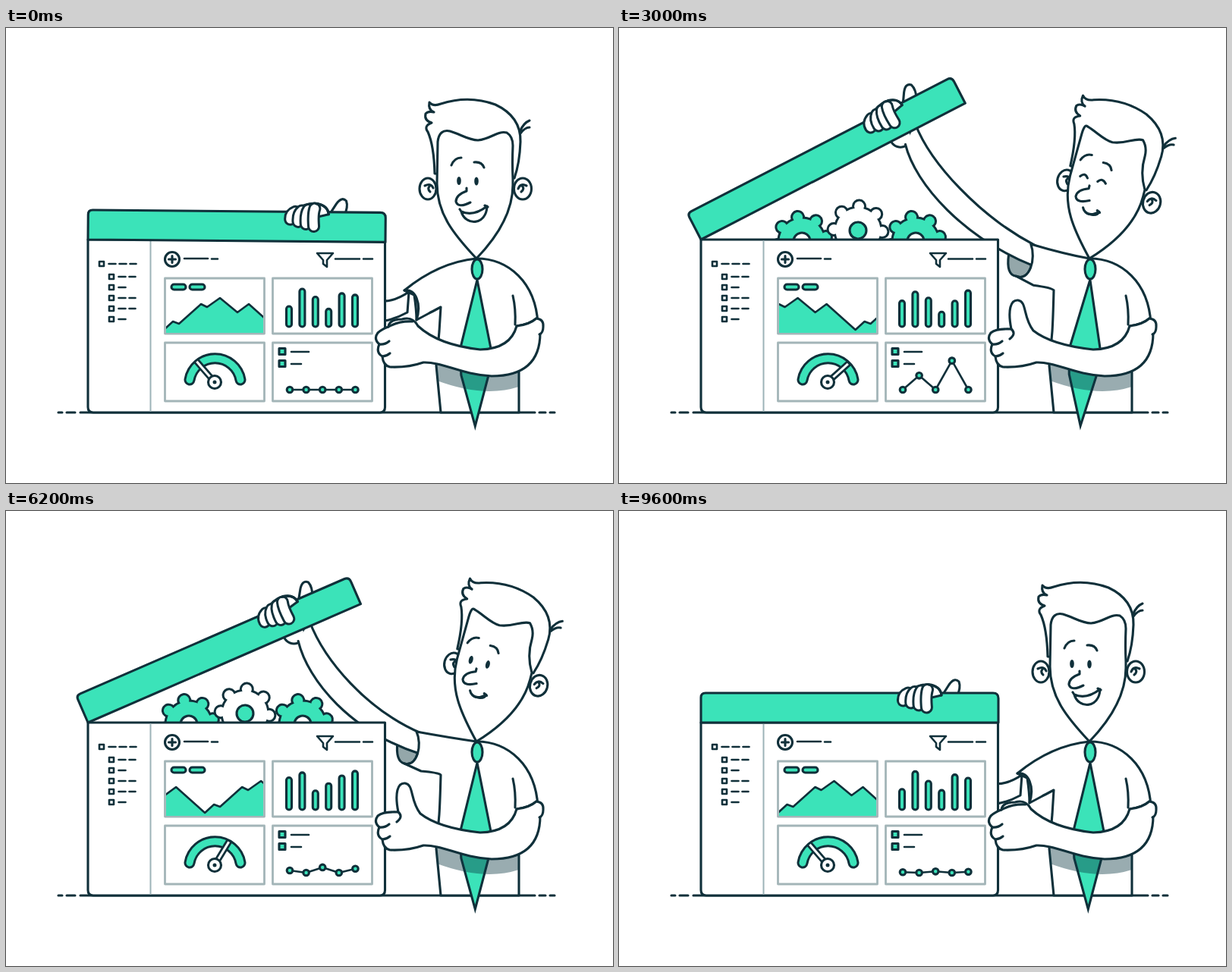
Write an HTML page that moves like this. It is 800 px wide and 600 px high and loops after 9.7 s.

```html
<!DOCTYPE html>
<html lang="en">
<head>
<meta charset="utf-8">
<title>Dashboard box</title>
<style>
  html, body { margin: 0; width: 100%; height: 100%; overflow: hidden; background: #fff; }
  svg { display: block; width: 100vw; height: 100vh; }
  .ink { fill: none; stroke: #10303a; stroke-width: 3.1; stroke-linecap: round; stroke-linejoin: round; }
  .w { fill: #fff; }
  .g { fill: #3be3b9; }
  .d { fill: #10303a; stroke: none; }
  .thin { stroke-width: 2.6; }
  .frame { stroke: #a3b5b8; stroke-width: 2.8; }
</style>
</head>
<body>
<svg viewBox="0 0 800 600" class="ink">
  <defs>
    <clipPath id="areaClip"><rect x="211" y="331" width="128" height="71"/></clipPath>
  </defs>
  <path d="M69 507H74M80 507H91M98 507H697M703 507H711M717 507H723"/>

  <g id="gears"></g>

  <path id="cuffShade" fill="#94a7aa"/>
  <g class="lid"><circle class="w" cx="404" cy="279" r="14"/></g>
  <path id="backArm" class="w"/>
  <g class="lid"><path class="w" d="M424 246Q430 237 435 229Q442 219 448 225Q451 233 445 246Z"/></g>

  <path class="w" d="M108 279H499.500V500Q499.500 507 493 507H115Q108 507 108 500Z"/>
  <path d="M190.500 281V505" stroke="#9db4b8" stroke-width="2"/>
  <g id="side" class="w thin"></g>

  <circle class="w" cx="219" cy="305" r="9.500"/>
  <path d="M219 300.500V309.500M214.500 305H223.500"/>
  <path class="thin" d="M235 304H266M271 304.500H279M434 304.500H466M471 304.500H483"/>
  <path class="w thin" d="M410 297H431L423 306V315L418 311V306Z"/>

  <g id="frames" class="frame"></g>
  <path id="area" class="g thin" clip-path="url(#areaClip)"/>
  <rect class="g" x="218" y="338" width="19" height="7" rx="3.500"/>
  <rect class="g" x="242" y="338" width="20" height="7" rx="3.500"/>
  <g id="bars" class="g"></g>

  <path d="M242 464A34 34 0 0 1 309 464" stroke-width="15"/>
  <path d="M242 464A34 34 0 0 1 309 464" stroke="#3be3b9" stroke-width="9"/>
  <g id="needle" stroke-linecap="butt">
    <path d="M275 467V429" stroke-width="8.500"/>
    <path d="M275 467V431" stroke="#fff" stroke-width="3"/>
  </g>
  <circle class="w" cx="275" cy="467" r="8.500"/>
  <circle class="d" cx="275" cy="467" r="2.500"/>

  <rect class="g" x="360" y="422.500" width="8" height="8"/>
  <rect class="g" x="360" y="438.500" width="8" height="8"/>
  <path class="thin" d="M376 427H399M376 443H389"/>
  <path id="line" class="thin"/>
  <g id="dots" class="g"></g>

  <g class="lid">
    <path class="g" d="M108 279V246Q108 240 114 240H493Q500 240 500 247V279Z"/>
    <path class="w" d="M380 238Q396 227 411 229Q424 232 425 243L412 246L402 256L380 250Z"/>
    <g id="fingers"></g>
    <path d="M408 229Q424 231 425 243"/>
  </g>

  <path id="torso" class="w"/>
  <path d="M668 353Q672 370 671 391"/>
  <path id="tie" class="g" d="M621 332L641 428L637 458L620 525L601 458L599 425Z" stroke-linejoin="miter"/>
  <path id="shade" fill="#0e3a43" fill-opacity=".42" stroke="none"/>
  <ellipse class="g" cx="621" cy="318" rx="7" ry="13"/>
  <path id="arm" class="w"/>
  <path id="folds"/>
  <path class="w" d="M673 393Q690 391 699 383Q709 384 708 394Q708 402 703 404"/>

  <g id="head">
    <g id="earL">
      <ellipse class="w" cx="556" cy="212" rx="11" ry="14"/>
      <path d="M552 208Q560 204 563 211M558 209Q555 212 559 216"/>
    </g>
    <ellipse class="w" cx="681" cy="212" rx="11.500" ry="14"/>
    <path d="M675 212Q678 204 686 208M680 208Q684 212 679 216"/>
    <path d="M677 137Q682 125 690 122M678 139Q684 131 690 131"/>
    <path class="w" d="M565 192Q564 155 556 137Q550 129 561 125Q551 122 553 113Q557 109 564 111Q556 108 558 98Q563 104 573 100Q610 88 645 101Q679 117 678 150Q677 178 670 198Z"/>
    <path id="skin" class="w"/>
    <g id="face">
      <path d="M587 181Q591 171 600 171M617 177Q627 176 630 184"/>
      <path d="M607 211V215Q593 220 593 229Q596 238 612 230"/>
      <g id="open" class="d">
        <ellipse cx="597" cy="201.500" rx="2.800" ry="5.500"/>
        <ellipse cx="620" cy="202" rx="2.800" ry="5.500"/>
      </g>
      <path id="shut" d="M592 202Q597 195 602 202M616 203Q621 196 627 203"/>
      <path id="mouth" class="w"/>
    </g>
  </g>
</svg>
<script>
const LOOP = 9700, HALF = LOOP / 2, TEETH = 8, TAU = Math.PI * 2;
const $ = id => document.getElementById(id);
const set = (id, name, v) => $(id).setAttribute(name, v);
const mix = (a, b, k) => a + (b - a) * k;
const clamp = v => Math.min(1, Math.max(0, v));
const repeat = (n, fn) => Array.from({ length: n }, (_, i) => fn(i)).join("");

// Smooth step from 0 to 1, and a soft hump, between two times.
const rise = (t, a, b) => { const u = clamp((t - a) / (b - a)); return u * u * (3 - 2 * u); };
const hump = (t, a, b) => Math.sin(Math.PI * clamp((t - a) / (b - a))) ** 2;

const lidAngle = t => 27.3 * rise(t, 1850, 2950) - 3.8 * rise(t, 3000, 3900)
  - 2.4 * rise(t, 6300, 7400) - 21.1 * rise(t, 8000, 9500) - .5 * (1 - rise(t, 0, 600));
const headTurn = t => rise(t, 1900, 2850) - .72 * hump(t, 3200, 5200) - rise(t, 8000, 8700);
const tieSwing = t => .5 + 3.5 * (hump(t, 2000, 3600) + hump(t, 4500, 6100)) - 2.8 * hump(t, 3200, 4800);
const handShift = t => 10 * hump(t, 3000, 5000) - 11 * hump(t, 7400, 9400);
const gearSink = t => 62 * (1 - rise(t, 1600, 2900) + rise(t, 7800, 9300));
const smileSize = t => 1 - rise(t, 2300, 2700) + .35 * rise(t, 6300, 7000) + .65 * rise(t, 8000, 8400);
const needleTurn = t => -41 + 104 * (rise(t, 400, 1900) - rise(t, 2500, 4600));
const lineRise = t => rise(t, 600, 3200) - rise(t, 4100, HALF);

const ridge = [[0, 398], [12, 387], [20, 390], [49, 364], [57, 368], [74, 356], [97, 375], [112, 364]];
// Bars: mean top, swing, phase in turns.
const bars = [[359, 8, 0], [345, 3, .3], [361, 8, .6], [366, 9, .17], [351, 9, .27], [347, 5, -.04]];
const lifts = [[0, 19, 0, 39, 0], [15, 0, 35, 0, 26]];
const dotX = i => 374 + i * 21.6;
const gears = [[241, 281, "#3be3b9", "#fff"], [391, 281, "#3be3b9", "#fff"], [315, 267, "#fff", "#3be3b9"]];

function build() {
  $("gears").innerHTML = gears.map(([x, y, fill, hole], n) => {
    const layer = (grow, color) => `<g fill="${color}" stroke="none"><circle r="${31 + grow}"/>` +
      repeat(TEETH, i => `<circle cy="-32" r="${8 + grow}" transform="rotate(${i * 360 / TEETH})"/>`) + "</g>";
    return `<g id="gear${n}">${layer(1.5, "#10303a")}${layer(-1.5, fill)}<circle r="11" fill="${hole}"/></g>`;
  }).join("");

  $("side").innerHTML = repeat(6, i => {
    const x = i ? 139 : 126, y = 314 + 14 * i - (i ? 0 : 3), long = i ? (i === 2 || i === 5 ? 9 : 22) : 36;
    return `<rect x="${x - 3}" y="${y - 3}" width="6" height="6"/>` +
      `<path stroke-dasharray="9 5" d="M${x + 9.5} ${y}h${long}"/>`;
  });

  $("frames").innerHTML = repeat(4, i => {
    const low = i > 1;
    return `<rect x="${209.5 + 142 * (i % 2)}" y="${low ? 415 : 330}" width="131" height="${low ? 77 : 73}"/>`;
  });
  $("bars").innerHTML = repeat(6, i => `<rect id="bar${i}" x="${369.5 + i * 17.4}" width="7" rx="3.500"/>`);
  $("dots").innerHTML = repeat(5, i => `<circle id="dot${i}" cx="${dotX(i)}" r="3.800"/>`);

  $("fingers").innerHTML = repeat(4, i => {
    const d = `M${381 + 8.5 * i} ${240 - 1.500 * i}Q${374 + 10 * i} 243 ${374.5 + 10.3 * i} ${250 + 3 * i}`;
    return `<path d="${d}" stroke-width="17"/><path d="${d}" stroke="#fff" stroke-width="11"/>`;
  });
}

function drawCharts(t) {
  const shift = 358 - t * 150 / LOOP;
  let d = "M190 420";
  for (let k = -2; k < 2; k++)
    for (const [x, y] of ridge) d += `L${(x + shift + k * 150).toFixed(1)} ${y}`;
  set("area", "d", d + "L700 420Z");

  bars.forEach(([mean, swing, phase], i) => {
    const top = mean + swing * Math.cos(TAU * (2 * t / HALF - phase));
    set("bar" + i, "y", top);
    set("bar" + i, "height", 394 - top);
  });

  set("needle", "transform", `rotate(${needleTurn(t % HALF)} 275 467)`);

  const amp = lineRise(t % HALF);
  const ys = lifts[t < HALF ? 0 : 1].map(v => 477 - v * amp);
  set("line", "d", "M" + ys.map((y, i) => dotX(i) + " " + y).join("L"));
  ys.forEach((y, i) => set("dot" + i, "cy", y));
}

function drawTorso(lid, q) {
  const p = (x0, y0, x1, y1) => `${mix(x0, x1, q).toFixed(1)} ${mix(y0, y1, q).toFixed(1)} `;
  const sx = mix(525, 541, q), sy = mix(346, 291, q);
  const under = p(541, 385, 525, 333);
  const rim = "C" + p(540, 343, 549, 308) + p(548, 364, 542, 338) + under;
  set("torso", "d", `M620 304Q${p(570, 309, 585, 299)}${sx} ${sy}${rim}L${p(556, 377, 547, 343)}` +
    `Q${p(571, 369, 570, 345)}${p(573, 368, 573, 348)}Q572 385 571 400L567 445L573 507H676V445` +
    `L701 390C698 335 662 304 620 304Z`);
  set("cuffShade", "d", `M${sx} ${sy}${rim}Q${p(541, 372, 513, 330)}${p(538, 352, 516, 304)}Z`);

  // Raised arm: two edges from under the lid to the sleeve.
  const a = -lid * Math.PI / 180, bend = mix(40, -29, q);
  const wrist = (x, y) => [108 + x * Math.cos(a) - y * Math.sin(a), 279 + x * Math.sin(a) + y * Math.cos(a)];
  const [ux, uy] = wrist(321, -6), [lx, ly] = wrist(297, 12);
  const low = sy + 29;
  set("backArm", "d", `M${ux} ${uy}C${ux + 20} ${uy + 52} 475 ${sy + bend} ${sx + 6} ${sy + 2}` +
    `L${sx + 4} ${low}C455 ${low + bend} ${lx + 13} ${ly + 53} ${lx} ${ly}`);
}

function drawFrontArm(th, dy) {
  const h = (x0, y0, x1, y1) => `${mix(x0, x1, th).toFixed(1)} ${(mix(y0, y1, th) + dy).toFixed(1)} `;
  const f = (x, y, part = 1) => `${x} ${(y + dy * part).toFixed(1)} `;
  const root = h(504, 394, 517, 397);
  set("arm", "d", `M${root}C${h(505, 386, 512, 372)}${h(512, 384, 516, 358)}${h(522, 384, 526, 359)}` +
    `C${h(532, 381, 538, 361)}${h(538, 384, 532, 381)}${h(543, 393, 546, 399)}` +
    `Q${f(570, 418, .6)}${f(625, 424, .2)}Q665 423 673 393Q690 391 699 383L704 402Q704 459 640 459` +
    `C${f(600, 457, .3)}${f(575, 440, .9)}${f(550, 441)}Q${f(530, 448)}${f(506, 447)}` +
    `Q${f(497, 445)}${f(496, 433)}Q${f(487, 428)}${f(492, 417)}Q${f(484, 410)}${f(490, 402)}Q${f(497, 396)}${root}`);
  set("folds", "d", `M${f(492, 417)}Q${f(499, 418)}${f(505, 413)}M${f(496, 433)}Q${f(501, 433)}${f(506, 429)}` +
    `M${root}Q${h(518, 386, 524, 403)}${h(536, 387, 515, 410)}`);
  set("shade", "d", `M568 ${440 + dy * .6}H676V473Q630 ${488 + dy * .4} 568 ${465 + dy * .6}Z`);
}

function drawHead(t) {
  const side = headTurn(t), s = smileSize(t);
  const x = v => (v - 11 * side).toFixed(1) + " ";
  set("head", "transform", `rotate(${14.5 * side} 620 304)`);
  set("face", "transform", `translate(${-11 * side} 0)`);
  set("earL", "transform", `translate(${8 * side} 0)`);

  // The hairline slides across the skull as the head turns.
  set("skin", "d", `M568 205L569 150Q${571 - 2 * side} 133 ${x(585)}136C${x(599)}140 ${x(610)}148 ${x(622)}148` +
    `C${x(640)}146 ${x(648)}135 ${x(660)}${138 - 3 * side}Q${x(668)}143 ${x(668)}155` +
    `Q${x(667)}178 668 198V207C668 245 645 278 620 304C590 272 568 245 568 205Z`);

  const shut = t >= 2800 && t < 6200;
  set("open", "visibility", shut ? "hidden" : "visible");
  set("shut", "visibility", shut ? "visible" : "hidden");
  const lx = mix(608, 600, s), ly = mix(244, 242, s), rx = mix(628, 634, s), ry = mix(241, 235, s);
  const low = mix(249, 261, s);
  set("mouth", "d", `M${lx - 2} ${ly - 3}L${lx} ${ly}Q616 ${mix(252, 249, s)} ${rx} ${ry}` +
    `C${rx - 1} ${low} ${lx + 5} ${low} ${lx} ${ly}M${rx - 3} ${ry - 1}L${rx + 1} ${ry + 1}`);
}

function draw(t) {
  const lid = lidAngle(t), open = Math.max(0, lid / 23.5);
  document.querySelectorAll(".lid").forEach(g => g.setAttribute("transform", `rotate(${-lid} 108 279)`));
  const sink = gearSink(t), spin = t * 405 / LOOP;
  gears.forEach(([x, y], n) =>
    set("gear" + n, "transform", `translate(${x} ${y + sink}) rotate(${n === 2 ? -7 - spin : spin})`));
  set("tie", "transform", `rotate(${tieSwing(t)} 621 330)`);
  drawCharts(t);
  drawTorso(lid, Math.pow(open, .7));
  drawFrontArm(clamp(open / .7), handShift(t));
  drawHead(t);
}

build();
const start = performance.now();
function tick() {
  const t = (performance.now() - start) % LOOP;
  draw(Math.floor(t / 100) * 100);
  requestAnimationFrame(tick);
}
tick();
</script>
</body>
</html>
```
